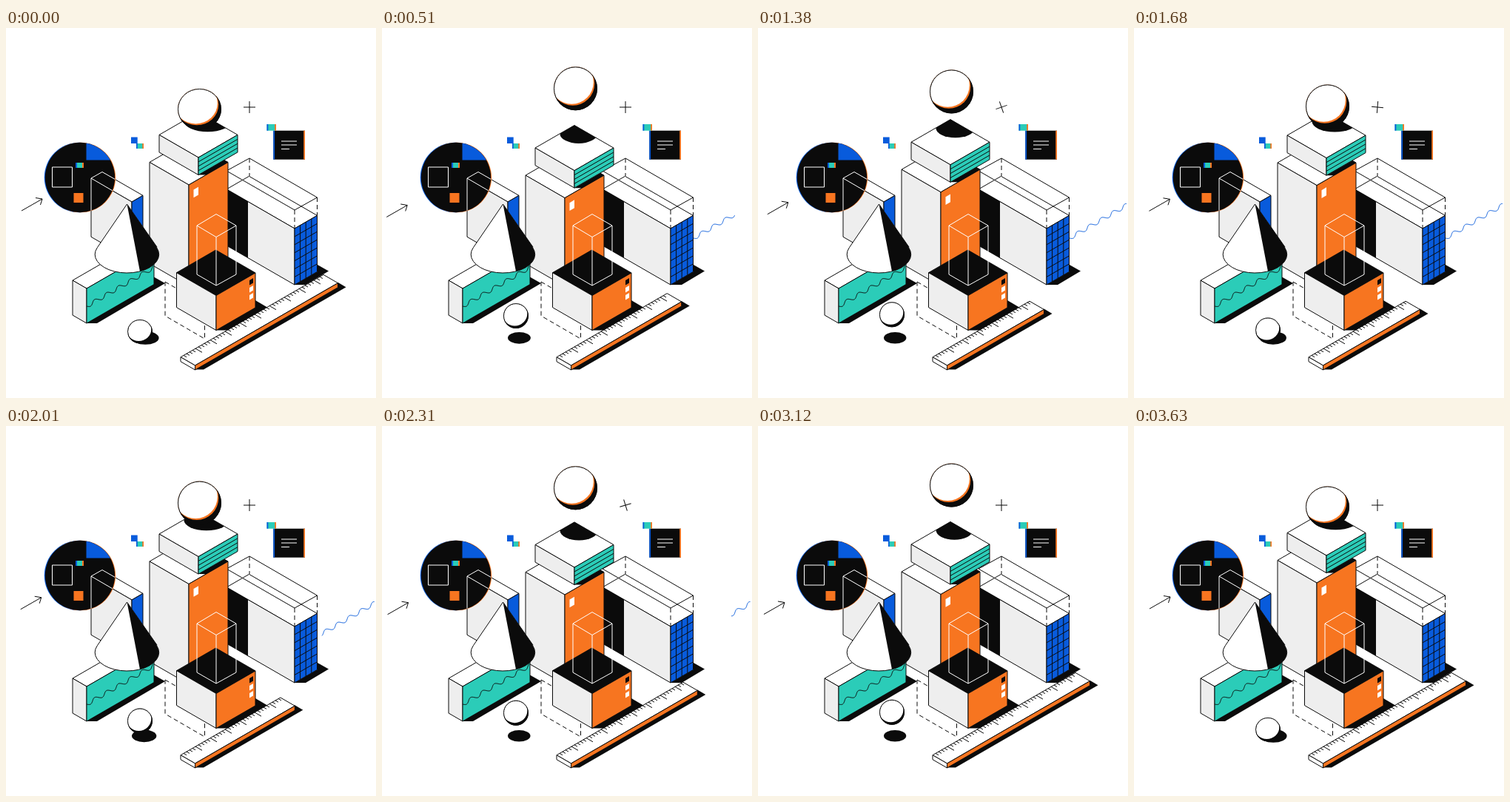
An HTML page with a canvas for the animation above (3.66 s loop, 500 by 500 pixels).

```html
<!DOCTYPE html>
<html>
<head>
<meta charset="utf-8">
<style>
html, body { margin: 0; width: 100%; height: 100%; overflow: hidden; background: #fff; }
canvas { display: block; width: 500px; height: 500px; }
</style>
</head>
<body>
<canvas id="stage" width="500" height="500"></canvas>
<script>
const canvas = document.getElementById('stage');
const ctx = canvas.getContext('2d');
const ratio = window.devicePixelRatio || 1;
canvas.width = canvas.height = 500 * ratio;
ctx.scale(ratio, ratio);

const BLACK = '#0b0b0b', WHITE = '#fff', GRAY = '#eee';
const TEAL = '#2bccb8', ORANGE = '#f77520', BLUE = '#085bdc';
const LOOP = 3660, HALF = 915, ISO = 0.577;

const clamp = v => Math.min(1, Math.max(0, v));
const cubic = (a, b, s) => 3 * a * s * (1 - s) ** 2 + 3 * b * s * s * (1 - s) + s ** 3;

function ease(x) {
  if (x <= 0) return 0;
  if (x >= 1) return 1;
  let lo = 0, hi = 1;
  for (let i = 0; i < 24; i++) {
    const mid = (lo + hi) / 2;
    if (cubic(0.53, 0.37, mid) < x) lo = mid; else hi = mid;
  }
  return cubic(0, 1, lo);
}
const span = (t, from, to) => ease((t - from) / (to - from));
const sway = t => {
  const u = (t % (2 * HALF)) / HALF;
  return u < 1 ? ease(u) : 1 - ease(u - 1);
};

function trace(points, closed) {
  ctx.beginPath();
  for (let i = 0; i < points.length; i += 2) ctx.lineTo(points[i], points[i + 1]);
  if (closed) ctx.closePath();
}
function line(points, color = BLACK) {
  trace(points);
  ctx.strokeStyle = color;
  ctx.stroke();
}
function poly(points, fill, stroke) {
  trace(points, true);
  if (fill) { ctx.fillStyle = fill; ctx.fill(); }
  if (stroke) { ctx.strokeStyle = stroke; ctx.stroke(); }
}
function rect(x, y, w, h, color) {
  ctx.fillStyle = color;
  ctx.fillRect(x, y, w, h);
}
function ellipse(x, y, rx, ry, color) {
  ctx.beginPath();
  ctx.ellipse(x, y, rx, ry, 0, 0, 2 * Math.PI);
  ctx.fillStyle = color;
  ctx.fill();
}
function clipped(draw) {
  ctx.save();
  ctx.clip();
  draw();
  ctx.restore();
}
function dashed(...paths) {
  ctx.setLineDash([6, 4]);
  paths.forEach(p => line(p));
  ctx.setLineDash([]);
}
// Box seen from its front corner: a runs left, b runs right, h goes down.
function box(x, y, a, b, h, left, right, top) {
  const l = y - a * ISO, r = y - b * ISO;
  poly([x, y, x - a, l, x - a + b, l - b * ISO, x + b, r], top, BLACK);
  poly([x, y, x - a, l, x - a, l + h, x, y + h], left, BLACK);
  poly([x, y, x + b, r, x + b, r + h, x, y + h], right, BLACK);
}
function wave(x0, y0, from, to, period, amp, color) {
  const points = [];
  for (let d = from; d <= to; d += 0.5) {
    const s = amp * Math.sin(2 * Math.PI * d / period);
    points.push(x0 + d + s * 0.5, y0 - d * ISO + s * 0.87);
  }
  line(points, color);
}
// Glitch tile with coloured fringes at both sides.
function tile(x, y, w, h, color, fringe) {
  rect(x, y, w, h, color);
  rect(x, y, fringe, h, BLUE);
  rect(x + w - fringe, y, fringe, h, ORANGE);
}
function ball(x, top, r, squash, layers) {
  ctx.save();
  ctx.translate(x, top);
  ctx.scale(1, squash);
  ellipse(0, r, r, r, BLACK);
  clipped(() => layers.forEach(([dx, dy, color]) => ellipse(dx, r + dy, r, r, color)));
  ctx.beginPath();
  ctx.arc(0, r, r - 0.5, 0, 2 * Math.PI);
  ctx.strokeStyle = BLACK;
  ctx.stroke();
  ctx.restore();
}

function drawDisc() {
  const outline = color => {
    line([115, 282, 115, 203, 170, 235, 170, 290], color);
    line([115, 203, 130, 194.5, 185, 226, 170, 235], color);
  };
  box(170, 235, 55, 15, 79, GRAY, BLUE, WHITE);
  ellipse(99, 202, 47.3, 47.3, BLUE);
  ellipse(100.8, 202, 47.3, 47.3, ORANGE);
  ellipse(100, 202, 47.2, 47.2, BLACK);
  clipped(() => {
    rect(108.5, 150, 40, 28.5, BLUE);
    outline(WHITE);
  });
  ctx.strokeStyle = WHITE;
  ctx.strokeRect(62.5, 188, 27, 27);
  tile(94, 182, 11, 7, TEAL, 2);
  rect(91.5, 223, 13, 13, ORANGE);
}

function drawTiles() {
  rect(169, 147.5, 8.7, 8.5, BLUE);
  tile(176, 156, 10, 7, TEAL, 1.7);
  tile(361.3, 138.7, 42.7, 39, BLACK, 1.8);
  tile(352.5, 130, 12.5, 8.7, TEAL, 1.8);
  [[153, 393], [158, 393], [163.5, 383]].forEach(([y, x]) => line([372, y, x, y], WHITE));
}

function drawArrow(shift) {
  const x = 49 - 21 * shift, y = 231 + 12 * shift;
  line([x - 28, y + 16, x, y]);
  line([x - 9, y - 1.5, x, y, x - 2.5, y + 8]);
}

function drawPlus(t) {
  const turn = span(t, HALF, 2 * HALF) + span(t, 2190, 2700);
  ctx.save();
  ctx.translate(329, 107);
  ctx.rotate(-Math.PI * turn);
  line([-8, 0, 8, 0]);
  line([0, -8, 0, 8]);
  ctx.restore();
}

function drawGridBlock(t) {
  wave(421, 284, 78 * span(t, 2 * HALF, 3 * HALF), 78 * span(t, 0, HALF), 16, 2.6, BLUE);
  poly([390, 347, 421, 329, 421, 320, 436, 328.5, 405, 347], BLACK);
  box(390, 271, 92, 30.5, 76, GRAY, BLUE, WHITE);
  poly([298, 218, 327, 234.5, 327, 310.5, 298, 294], BLACK);
  for (let i = 1; i < 4; i++) {
    const x = 390 + i * 7.6, y = 271 - i * 4.4;
    line([x, y, x, y + 76]);
  }
  for (let i = 1; i < 7; i++) line([390, 271 + i * 10.9, 420.5, 253.4 + i * 10.9]);
  poly([298, 193, 329, 176, 420.5, 229, 390, 246], null, BLACK);
  dashed([329, 176, 329, 200], [420.5, 229, 420.5, 253], [390, 246, 390, 271]);
}

function drawTower(t) {
  const drop = 25 * sway(t);
  const lift = Math.sin(Math.PI * (t % (2 * HALF)) / (2 * HALF)) ** 1.5;
  const y = 212 + drop, s = 175 + drop;

  box(247, y, 53, 53, 349 - y, GRAY, ORANGE, WHITE);
  trace([247, y, 194, y - 30.6, 247, y - 61.2, 300, y - 30.6], true);
  clipped(() => poly([260, s + 23.5, 275, s + 23.5, 328, s - 7, 313, s - 7], BLACK));
  poly([253.5, y + 6.5, 260, y + 2.7, 260, y + 13.5, 253.5, y + 17.3], WHITE);

  box(260, s, 53, 53, 23.5, GRAY, TEAL, WHITE);
  for (let i = 1; i < 4; i++) line([260, s + i * 5.9, 313, s - 30.6 + i * 5.9]);
  trace([260, s, 207, s - 30.6, 260, s - 61.2, 313, s - 30.6], true);
  const rx = 32 - 10 * lift;
  clipped(() => ellipse(240.5 + rx, s - 49.2 - 0.8 * lift, rx, 14.5 - 2.2 * lift, BLACK));

  const squash = 1 - 0.06 * clamp(1 - lift / 0.1);
  ball(261.5, 82 - 44 * lift, 29.5, squash, [[-3.7, -6.6, ORANGE], [-5.2, -8.6, WHITE]]);
}

function drawConeBlock() {
  poly([109, 399, 123, 399, 215, 345, 200, 336.5], BLACK);
  box(109, 352, 19, 91, 47, GRAY, TEAL, WHITE);
  wave(109, 376, 0, 91, 16, 2.6, BLACK);

  const cone = () => {
    ctx.beginPath();
    ctx.moveTo(163.5, 238);
    ctx.lineTo(204, 296);
    ctx.ellipse(163.5, 306, 43.2, 25, 0, -0.38, Math.PI + 0.38);
    ctx.closePath();
  };
  cone();
  ctx.fillStyle = WHITE;
  ctx.fill();
  clipped(() => poly([163.5, 238, 181, 329, 181, 340, 215, 340, 215, 238], BLACK));
  cone();
  ctx.strokeStyle = BLACK;
  ctx.stroke();
}

function drawSmallBall(t) {
  const q = clamp((t % HALF) / HALF / 0.9);
  const lift = Math.sin(Math.PI * q) ** 1.5;
  const rx = 18.3 - 3.2 * lift;
  ellipse(170 + rx, 418.8, rx, 9 - 1.3 * lift, BLACK);
  ball(181, 394 - 24.5 * lift, 17, 1 - 0.05 * clamp(1 - lift / 0.15), [[-1.6, -3.6, WHITE]]);
}

function drawCube() {
  dashed([215, 343, 268.5, 374, 268.5, 420, 215, 389, 215, 343]);
  poly([284, 408.5, 301, 408.5, 354, 378, 337, 368], BLACK);
  box(284, 361.5, 53.5, 53, 47, GRAY, ORANGE, BLACK);
  [BLACK, WHITE, WHITE].forEach((color, i) => {
    const y = 341 + i * 10;
    poly([329, y, 334, y - 3, 334, y + 3.5, 329, y + 6.5], color);
  });
  poly([284, 251.5, 311, 267, 284, 282.5, 258, 267], null, WHITE);
  line([258, 267, 258, 333, 284, 348, 311, 333, 311, 267], WHITE);
  line([284, 282.5, 284, 348], WHITE);
}

function drawRuler(t) {
  const size = 193 - 62 * (span(t, 0, HALF) - span(t, 2 * HALF, 3 * HALF));
  const x = 255.5 + size, y = 456 - size * ISO;
  poly([255, 461.5, 267, 461.5, x + 11, y + 5.5, x, y - 1], BLACK);
  box(255.5, 456, 19.5, size, 6, WHITE, ORANGE, WHITE);
  for (let i = 1; i * 4 < size - 2; i++) {
    const tx = 236 + i * 4, ty = 444.7 - i * 4 * ISO;
    const len = i % 5 ? 4 : 9;
    line([tx, ty, tx + len, ty + len * ISO]);
  }
}

function draw(t) {
  ctx.fillStyle = WHITE;
  ctx.fillRect(0, 0, 500, 500);
  ctx.lineWidth = 1;
  ctx.lineJoin = 'round';
  drawArrow(sway(t));
  drawPlus(t);
  drawTiles();
  drawGridBlock(t);
  drawTower(t);
  drawDisc();
  drawConeBlock();
  drawSmallBall(t);
  drawCube();
  drawRuler(t);
}

const start = performance.now();
function frame() {
  draw((performance.now() - start) % LOOP);
  requestAnimationFrame(frame);
}
frame();
</script>
</body>
</html>
```
